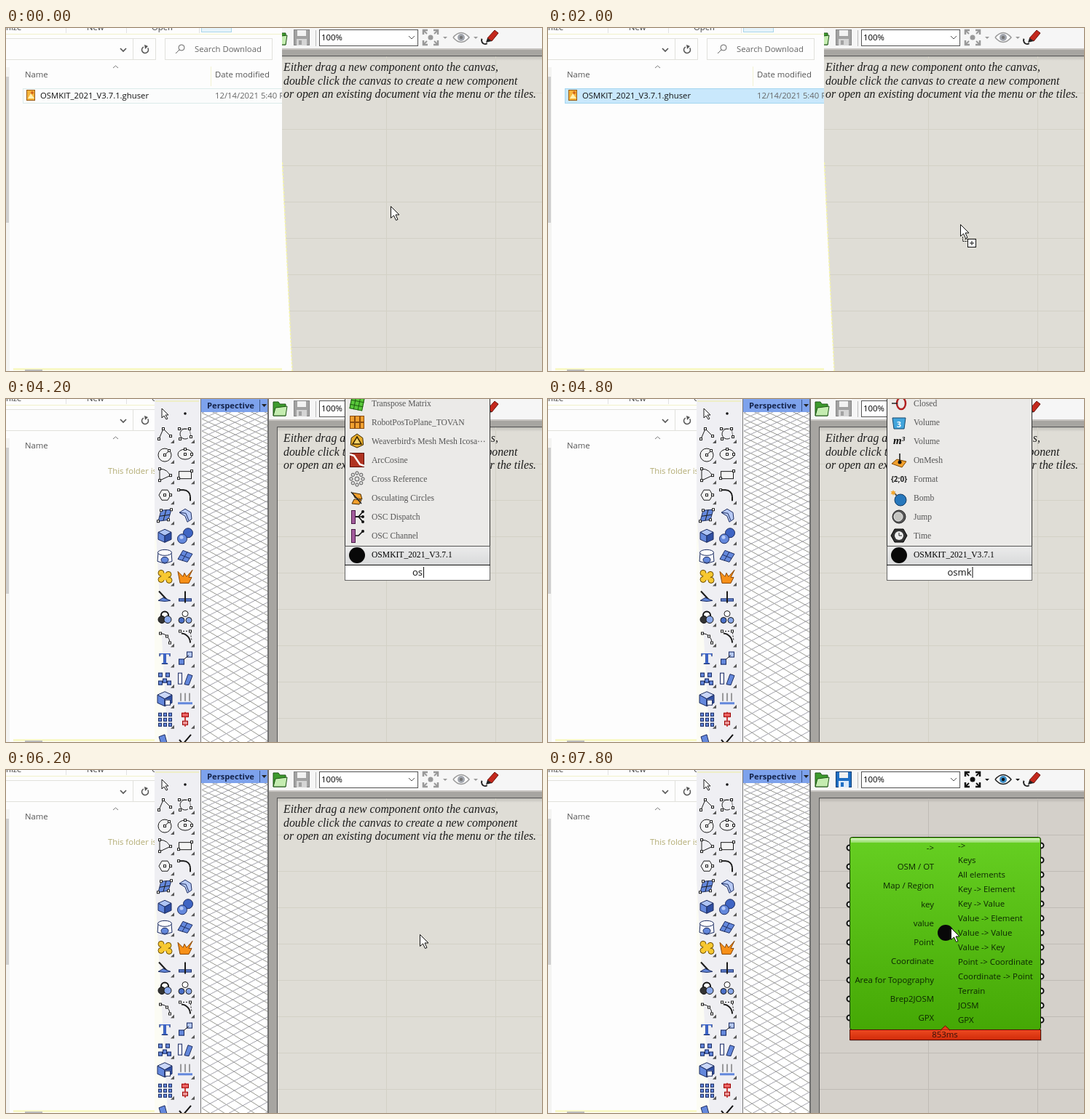
An HTML page with a canvas that plays this animation: 736 by 472 pixels, repeating every 8 s.

```html
<!DOCTYPE html>
<html lang="en">
<head>
<meta charset="utf-8">
<title>Component search</title>
<style>
html, body { margin: 0; width: 100%; height: 100%; overflow: hidden; background: #fff; }
canvas { display: block; }
</style>
</head>
<body>
<canvas id="stage" width="736" height="472"></canvas>
<script>
const g = document.getElementById('stage').getContext('2d');
const LOOP = 8000, STEP = 200, TAU = Math.PI * 2;
const SANS = '"Open Sans", "Noto Sans", sans-serif';
const SERIF = '"Liberation Serif", "Noto Serif", serif';
const BLUE = '#6488dc', NAVY = '#1c2c60', INK = '#1a1a1a';

// When things happen, in ms
const HOVER = 800, SELECT = 1000, DRAG = 1400, DROP = 2200, SWITCH = 2600,
  POPUP = 3000, TIP = 5400, CLOSE = 5800, PLACE = 6400;
const KEYS = [3800, 4000, 4600, 4800];

// ---- drawing helpers ----
function box(x, y, w, h, fill, edge) {
  if (fill) { g.fillStyle = fill; g.fillRect(x, y, w, h); }
  if (edge) { g.strokeStyle = edge; g.lineWidth = 1; g.strokeRect(x + .5, y + .5, w - 1, h - 1); }
}
function finish(fill, edge, w = 1) {
  if (fill) { g.fillStyle = fill; g.fill(); }
  if (edge) { g.strokeStyle = edge; g.lineWidth = w; g.stroke(); }
}
function trace(p) {
  g.beginPath();
  for (let i = 0; i < p.length; i += 2) g.lineTo(p[i], p[i + 1]);
}
function poly(p, fill, edge, w) { trace(p); g.closePath(); finish(fill, edge, w); }
function line(p, edge = INK, w = 1) { trace(p); finish(null, edge, w); }
function disc(x, y, r, fill, edge, w, ry = r) {
  g.beginPath(); g.ellipse(x, y, r, ry, 0, 0, TAU); finish(fill, edge, w);
}
function arc(x, y, r, a, b, edge = INK, w = 1) {
  g.beginPath(); g.arc(x, y, r, a, b); finish(null, edge, w);
}
function text(s, x, y, font, color = '#000', align = 'left') {
  g.font = font; g.fillStyle = color; g.textAlign = align; g.fillText(s, x, y);
}
function at(x, y, draw) { g.save(); g.translate(x, y); draw(); g.restore(); }
function clip(x, y, w, h, draw) {
  g.save(); g.beginPath(); g.rect(x, y, w, h); g.clip(); draw(); g.restore();
}
function fade(y0, y1, a, b) {
  const f = g.createLinearGradient(0, y0, 0, y1);
  f.addColorStop(0, a); f.addColorStop(1, b);
  return f;
}
function nodes(p) {
  for (let i = 0; i < p.length; i += 2) box(p[i] - 2, p[i + 1] - 2, 4, 4, '#fff', INK);
}
function star(n, r, inner, fill, edge) {
  const p = [];
  for (let i = 0; i < n * 2; i++) {
    const a = i * Math.PI / n, d = i % 2 ? inner : r;
    p.push(Math.sin(a) * d, -Math.cos(a) * d);
  }
  poly(p, fill, edge);
}
function cube(r, top, left, right) {
  const h = r * .55;
  poly([0, -r, r, -h, 0, 0, -r, -h], top, NAVY);
  poly([-r, -h, 0, 0, 0, r, -r, h], left, NAVY);
  poly([r, -h, 0, 0, 0, r, r, h], right, NAVY);
}
const logo = (x, y, r) => disc(x, y, r, '#080808');

// ---- modelling toolbar ----
const tools = [
  () => poly([-4, -7, -4, 6, -1, 3, 2, 8, 4, 7, 1, 2, 5, 2], '#fff', INK),
  () => disc(0, 0, 1.8, '#111'),
  () => { line([-8, 7, -2, -7, 8, 3]); nodes([-8, 7, -2, -7, 8, 3]); },
  () => { line([-8, -7, 6, -7, 8, 4], '#777'); arc(0, 0, 7, 1, 5); nodes([-8, -7, 6, -7, 8, 4, -7, 7]); },
  () => { disc(0, 1, 9, '#f4f4f4', INK); line([0, 1, 6, -5]); nodes([0, 1, 6, -5]); },
  () => { disc(0, 0, 10, '#f4f4f4', INK, 1, 7); nodes([0, 0, 0, -7, 9, 0]); },
  () => { line([-7, 8, -7, -8]); arc(-7, 8, 16, -1.5, -.4); line([-7, 8, 8, 1]); nodes([-7, 8, -7, -8, 8, 1]); },
  () => { box(-9, -5, 18, 11, '#f4f4f4', INK); nodes([-9, 5, 9, -5]); },
  () => { poly([-8, 0, -4, -7, 4, -7, 8, 0, 4, 7, -4, 7], '#f4f4f4', INK); nodes([0, 0, 8, 0]); },
  () => { line([-9, -7, -2, -7], INK, 2); arc(-2, 2, 9, -1.57, 0, INK, 2); line([7, 2, 7, 8], INK, 2); nodes([-9, -7]); },
  () => { poly([-5, -7, 9, -8, 5, 6, -9, 8], BLUE, NAVY); line([2, -8, -2, 7]); line([-7, 1, 7, -1]); nodes([-5, -7, 9, -8, 5, 6, -9, 8]); },
  () => { poly([-8, -4, 0, -9, 8, -4, 9, 5, 3, 9, 0, 1], '#b9cbf6', NAVY); line([-8, -4, 1, -3, 5, 7], NAVY); },
  () => cube(9, '#aec4f4', BLUE, '#2f4fa4'),
  () => { disc(4, -4, 6.5, '#3f65c4', NAVY); disc(-4, 4, 6.5, BLUE, NAVY); disc(-5, 2, 2.5, '#b6caf8'); },
  () => { poly([-9, -5, -10, 7, 0, 10, 10, 7, 9, -5], '#f4f6ff', NAVY); disc(0, 5, 5, BLUE, NAVY, 1, 4); disc(0, -5, 9.5, '#fff', NAVY, 1, 4); },
  () => { poly([-10, 4, -3, -8, 10, -3, 3, 8], BLUE, NAVY); line([-6, -2, 6, 3], NAVY); line([3, -6, -4, 6], NAVY); },
  () => { for (const [x, y] of [[-5, -5], [0, 0], [6, 5], [-5, 4], [5, -3]]) { disc(x, y, 4, '#f8c830', '#6c4c00'); } disc(0, 0, 5, '#f8c830'); },
  () => poly([-10, -7, -3, 0, -1, -5, 2, 0, 10, -9, 5, 1, 9, 1, 5, 9, -7, 9], '#f79018', '#8a4400'),
  () => { line([-8, -8, 4, 5], INK, 2); poly([-9, 5, -2, 1, 8, 5, 0, 6], BLUE, NAVY); },
  () => { box(-9, 2, 18, 4, BLUE, NAVY); line([0, -8, 0, 8], INK, 2); },
  () => { disc(0, -3, 5, '#fff', '#111', 2); disc(-4, 3, 5, '#333', '#111'); disc(4, 3, 5, '#89a8ea', '#111'); },
  () => { disc(0, -5, 4, '#fff', INK); disc(-5, 4, 4, '#4a6fc8', INK); disc(5, 4, 4, '#89a8ea', INK); },
  () => { arc(-6, 7, 13, -1.5, 0); nodes([-6, -6, 3, -2, 7, 7]); },
  () => { arc(-6, 7, 13, -1.5, 0, INK, 2); g.setLineDash([2, 2]); line([-7, -9, 7, -9, 9, 4]); g.setLineDash([]); nodes([-7, -9, 7, -9]); },
  () => { text('T', 0, 8, 'bold 24px ' + SERIF, NAVY, 'center'); text('T', 0, 7, 'bold 22px ' + SERIF, '#3c66cc', 'center'); },
  () => { box(-9, 1, 8, 8, BLUE, NAVY); box(2, -9, 8, 8, '#b6c9f4', NAVY); line([-2, 2, 5, -4]); },
  () => { for (const [x, y] of [[-9, -8], [1, -8], [-3, 0], [-9, 3], [3, 3]]) box(x, y, 6, 6, BLUE, NAVY); },
  () => { box(-10, -8, 6, 16, '#eef', NAVY); poly([-1, 8, 4, -6, 10, -4, 5, 9], BLUE, NAVY); },
  () => { cube(10, '#cbd8f8', BLUE, '#2f4fa4'); box(0, 1, 8, 8, '#fff', NAVY); },
  () => { line([-10, 6, 10, 6], BLUE, 3); for (let x = -6; x < 8; x += 6) line([x, -8, x, 3], '#444'); },
  () => { for (let i = 0; i < 9; i++) box(-9 + i % 3 * 7, -9 + (i / 3 | 0) * 7, 5, 5, BLUE, NAVY); },
  () => { line([0, -10, 0, 10], '#c00', 1.5); box(-5, -9, 10, 6, '#e66', '#900'); box(-4, 2, 8, 6, '#e99', '#900'); },
  () => poly([-8, -4, 0, -7, 4, 8, -4, 9], BLUE, NAVY),
  () => line([-8, 0, -3, 6, 8, -7], '#111', 2)
];

function modeller() {
  box(204, 0, 64, 472, '#efeff3');
  poly([204, 150, 222, 472, 204, 472], '#fcfcf4');
  box(205, 2, 60, 2, '#eeeec8');
  tools.forEach((draw, i) => {
    const x = i % 2 ? 246 : 218, y = 20 + (i >> 1) * 28.05;
    at(x, y, draw);
    if (i > 1) poly([x + 13, y + 8, x + 13, y + 13, x + 8, y + 13], '#555');
  });
  box(267, 0, 94, 472, '#fff');
  clip(269, 18, 90, 454, () => {
    for (let y = -45; y < 560; y += 8 + Math.max(0, y) * .012) {
      line([269, y, 360, y + 42 + y * .04], '#989991');
      line([269, y, 360, y - 40 - y * .02], '#a2a2ac');
    }
  });
  box(268, 0, 92, 18, '#7da2ec');
  text('Perspective', 276, 13, 'bold 11.2px ' + SANS, '#14234a');
  line([348.5, 1, 348.5, 17], '#3d5788');
  poly([351, 7, 358, 7, 354.5, 11], '#222');
  box(267, 0, 1, 472, '#777');
  box(359, 0, 2, 472, '#707070');
}

// ---- file browser ----
function browser(t, wide) {
  const w = wide ? 379 : 204, f = '11.3px ' + SANS;
  if (wide) {
    poly([379, 0, 379, 185, 393, 472, 0, 472, 0, 0], '#fdfdfd');
    g.setLineDash([3, 2]);
    line([379.5, 185, 393, 472], '#f6f6a8', 1.5);
    g.setLineDash([]);
  }
  clip(0, 0, w, 472, () => {
    box(0, 0, w, 472, '#fdfdfd');
    text('nize', 0, 3, f, '#444');
    text('New', 111, 3, f, '#444');
    text('Open', 200, 3, f, '#444');
    for (const x of [82, 165, 265]) box(x, 0, 1, 7, '#e2e2e2');
    box(268, -2, 42, 8, '#e6f4fb', '#a9d5e8');
    box(0, 8, w, 1, '#f2f2ca');
    box(-2, 14, 177, 30, '#fdfdfd', '#e1e1dc');
    box(174, 14, 32, 30, '#fdfdfd', '#e1e1dc');
    line([157, 28, 161, 32, 165, 28], '#555', 1.6);
    arc(191, 30, 4.5, -.6, 4.2, '#555', 1.5);
    poly([190, 23, 195, 25, 191, 29], '#555');
    box(218, 14, 148, 30, '#fdfdfd', '#e1e1dc');
    disc(241, 27, 4, null, '#666');
    line([238, 30, 233, 35], '#666');
    text('Search Download', 259, 33, f, '#666');
    line([147, 55, 150.5, 52, 154, 55], '#777');
    text('Name', 26, 68, f, '#555');
    text('Date modified', 287, 68, f, '#555');
    box(281, 53, 1, 27, '#f1f1d2');
    box(0, 54, 5, 418, '#f4f4f2');
    box(0, 67, 4, 201, '#cfcfcf');
    box(10, 468, w, 3, '#f8f8c6');
    box(26, 470, 24, 2, '#bbb');
    if (t >= DROP) text('This folder is empty.', 140, 103, f, '#b2ab72');
    else {
      const fill = t >= SELECT ? '#c9e8fc' : t >= HOVER ? '#e5f3fd' : '#fbfcfc';
      box(23, 83, 370, 21, fill, t >= HOVER ? '#a5d6f0' : '#dcebea');
      box(28, 85, 12, 15, '#f6b43a', '#9a5a12');
      poly([30, 97, 34, 90, 39, 97], '#fff0b0');
      disc(36, 89, 2, '#d4691e');
      text('OSMKIT_2021_V3.7.1.ghuser', 47, 97, f, '#111');
      text('12/14/2021 5:40 PM', 287, 97, f, '#666');
    }
  });
}

// ---- node editor ----
function editor(live) {
  box(361, 0, 375, 28, '#f6f6f6');
  poly([367, 4, 374, 4, 376, 7, 384, 7, 384, 23, 367, 23], '#3e9b2e', '#1c5514');
  poly([370, 12, 386, 10, 384, 23, 367, 23], '#c4ecb0', '#1c5514');
  const save = live ? '#1f6fc4' : '#a2a2a2';
  box(395, 2, 22, 22, save, live ? '#0d3c74' : '#858585');
  box(400, 3, 12, 8, '#f2f2f2');
  box(399, 15, 14, 9, live ? '#dceafa' : '#d5d5d5');
  box(402, 17, 4, 6, save);
  box(425, 3, 1, 22, '#bbb');
  box(430, 2, 136, 23, '#fff', '#555');
  text('100%', 433, 17, '11.4px ' + SANS);
  line([553, 11, 557, 15, 561, 11], '#555');

  const ink = live ? '#111' : '#999';
  at(583, 13, () => {
    disc(0, 0, 3.5, ink);
    for (let i = 0; i < 4; i++) {
      line([-10, -4, -10, -10, -4, -10], ink, 2.5);
      line([-9, -9, -5, -5], ink, 2);
      g.rotate(Math.PI / 2);
    }
  });
  for (const x of [603, 645]) poly([x - 3, 12, x + 3, 12, x, 15], ink);
  at(625, 13, () => {
    g.beginPath(); g.moveTo(-11, 0); g.quadraticCurveTo(0, -13, 11, 0);
    g.quadraticCurveTo(0, 13, -11, 0); finish('#fff', live ? '#222' : '#999', 1.5);
    disc(0, 0, 5, live ? '#3b8cc4' : '#a2a6ae');
    disc(0, 0, 2.2, live ? '#111' : '#777');
  });
  poly([661, 14, 671, 3, 676, 7, 667, 18], '#c4281c', '#6b140c');
  poly([661, 14, 667, 18, 659, 20], '#222');
  arc(658, 17, 5, 1, 3.6, '#222', 2);

  box(361, 28, 375, 444, '#a7a5a1');
  box(361, 28, 375, 2, '#c6c4c0');
  box(372, 38, 370, 440, live ? '#d4d0ca' : '#dfddd6', '#555');
  box(373, 39, 363, 6, fade(39, 45, 'rgba(0,0,0,.14)', 'rgba(0,0,0,0)'));
  const rule = live ? '#bfbbb5' : '#d3d1c6';
  for (let y = 89; y < 472; y += 50) box(373, y, 363, 1, rule);
  for (const x of [522, 672]) box(x, 39, 1, 433, rule);
  if (!live) [
    'Either drag a new component onto the canvas,',
    'double click the canvas to create a new component',
    'or open an existing document via the menu or the tiles.'
  ].forEach((s, i) => text(s, 381, 59 + i * 18.6, 'italic 15.8px ' + SERIF, '#1c1c1c'));
}

// ---- search results ----
const plug = dots => {
  box(-8, -9, 6, 19, '#a35b9c', '#4a1d47');
  for (const y of dots) { line([-2, 0, 2, 0, 8, y], '#111', 1.5); disc(8, y, 2, '#111'); }
};
const m3 = s => () => text(s, 0, 4, 'italic bold 15px ' + SERIF, '#111', 'center');
const broad = [
  ['Transpose Matrix', () => { g.rotate(.2); box(-9, -9, 18, 18, '#58c83a', '#1e5c12'); for (const p of [-3, 3]) { line([p, -9, p, 9], '#1e5c12'); line([-9, p, 9, p], '#1e5c12'); } }],
  ['RobotPosToPlane_TOVAN', () => { box(-10, -9, 20, 18, '#f0a030', '#8a4c10'); line([-3, -9, -3, 9], '#8a4c10', 2); line([4, -9, 4, 9], '#8a4c10', 2); line([-10, 0, 10, 0], '#8a4c10', 2); }],
  ["Weaverbird's Mesh Mesh Icosa\u22ef", () => { star(3, 10, 9, '#e8ae2c', '#3a2600'); poly([0, -6, 6, 4, -6, 4], '#f6d46a', '#3a2600', 1.5); }],
  ['ArcCosine', () => { box(-10, -10, 20, 20, '#b03422', '#5c1008'); line([-10, -8, -4, -6, 4, 6, 10, 8], '#fff', 2.5); }],
  ['Cross Reference', () => { for (let i = 0; i < 8; i++) disc(Math.cos(i * TAU / 8) * 8, Math.sin(i * TAU / 8) * 8, 2.2, '#ddd', '#555'); disc(0, 0, 3, '#ddd', '#555'); }],
  ['Osculating Circles', () => { poly([-6, -7, 5, -5, 7, 2, -3, 0], '#f2a02c', '#4a2c00'); poly([-4, 2, 6, 3, 3, 9, -7, 8], '#f2a02c', '#4a2c00'); line([-8, -8, 6, 8], '#222', 1.5); }],
  ['OSC Dispatch', () => plug([-7, 0, 7])],
  ['OSC Channel', () => plug([-6])]
];
const narrow = [
  ['Closed', () => { disc(3, 0, 6, null, '#b02020', 2.5, 8); line([-10, 0, -2, 0], '#222', 1.5); }],
  ['Volume', () => { poly([-9, -6, 9, -6, 7, 9, -7, 9], '#42a5dc', '#14486e'); text('3', 0, 7, 'bold 11px ' + SANS, '#fff', 'center'); }],
  ['Volume', m3('m\u00b3')],
  ['OnMesh', () => { poly([-10, 5, -3, -1, 10, 2, 4, 10], '#f2a02c', '#7c4600'); line([1, -9, 1, 3], '#111', 1.5); disc(1, 3, 2.5, '#111'); }],
  ['Format', () => text('{2;0}', 0, 4, 'bold 10px ' + SANS, '#222', 'center')],
  ['Bomb', () => { disc(2, 3, 8, '#2878bc', '#123c66'); line([-3, -3, -7, -7], '#555', 2); at(-8, -7, () => star(6, 4, 2, '#f6a82c')); }],
  ['Jump', () => { disc(0, 0, 9, '#555', '#222'); disc(-1, 0, 6, '#c4c4c0', '#eee'); }],
  ['Time', () => { poly([-11, 0, -6, -9, 6, -9, 11, 0, 6, 9, -6, 9], '#333', '#000'); disc(0, 0, 6, '#eee'); line([0, -4, 0, 0, 4, 0], '#222'); }]
];

function search(t) {
  const f = '11.6px ' + SERIF;
  const typed = 'osmk'.slice(0, KEYS.filter(k => t >= k).length);
  if (!typed) {
    box(465, 190, 200, 39, '#f0f2f1', '#111');
    text('Enter a search keyword\u22ef', 566, 213, 'italic ' + f, '#111', 'center');
  } else {
    box(465, -2, 200, 231, '#ebeae8', '#333');
    (typed.length < 3 ? broad : narrow).forEach(([name, icon], i) => {
      at(482, 6 + i * 26, icon);
      text(name, 502, 10 + i * 26, f, '#555');
    });
    box(465, 202, 200, 27, fade(202, 229, '#ececec', '#d8d9da'), '#555');
    logo(482, 215, 11);
    text('OSMKIT_2021_V3.7.1', 502, 218, f);
  }
  box(465, 228, 200, 22, '#fff', '#666');
  box(465, 228, 200, 1, '#111');
  text(typed, 565, 243, '13px ' + SANS, '#111', 'center');
  if (typed && t < 5000) box(566 + g.measureText(typed).width / 2, 231, 1, 15, '#111');
  if (t >= TIP) {
    box(608, 253, 140, 55, '#fdf9c8', '#222');
    box(609, 254, 138, 33, fade(254, 287, '#fdd468', '#f8bd4c'));
    logo(625, 270, 11);
    text('OSMKIT_2021_V3.7.1', 650, 275, 'italic 15px ' + SANS, '#222');
    text('OSMKIT_2021_V3.7.1', 615, 301, '10.2px ' + SERIF);
  }
}

// ---- placed component ----
const inputs = ['->', 'OSM / OT', 'Map / Region', 'key', 'value', 'Point', 'Coordinate',
  'Area for Topography', 'Brep2JOSM', 'GPX'];
const outputs = ['->', 'Keys', 'All elements', 'Key -> Element', 'Key -> Value', 'Value -> Element',
  'Value -> Value', 'Value -> Key', 'Point -> Coordinate', 'Coordinate -> Point', 'Terrain', 'JOSM', 'GPX'];

function component(x, y) {
  at(x, y, () => {
    const f = '11.4px ' + SANS, ink = '#0c2603';
    box(1, 265, 263, 16, 'rgba(0,0,0,.15)');
    inputs.forEach((s, i) => disc(0, 15 + i * 26, 3.5, '#fff', '#111', 2));
    outputs.forEach((s, i) => disc(263, 12 + i * 20, 3.5, '#fff', '#111', 2));
    g.beginPath(); g.roundRect(.5, .5, 262, 265, 3);
    finish(fade(0, 265, '#66cf22', '#45a805'), '#152c08');
    box(2, 2, 259, 6, fade(2, 8, '#d6f2c4', '#94dc66'));
    box(0, 265, 263, 15, fade(265, 280, '#ee4a22', '#d02a08'), '#5c1004');
    poly([125, 266, 131.5, 260, 138, 266], '#e63c14', '#5c1004');
    box(126, 266, 11, 2, '#ee4a22');
    text('853ms', 131, 276, f, '#30100a', 'center');
    logo(132, 132, 11);
    inputs.forEach((s, i) => text(s, 116, 19 + i * 26, f, ink, 'right'));
    outputs.forEach((s, i) => text(s, 149, 16 + i * 20, f, ink));
  });
}

// ---- motion: [time, x, y] stops ----
const hand = [
  [0, 528, 245], [800, 150, 92], [1400, 150, 92], [2000, 566, 270], [2200, 566, 270],
  [2600, 566, 239], [5000, 566, 239], [5400, 578, 222], [5800, 578, 222],
  [6400, 564, 228], [6800, 564, 228], [7200, 604, 308], [7600, 496, 214], [7800, 553, 217]
];
const node = [[6800, 434, 107], [7200, 474, 187], [7600, 364, 89], [7800, 414, 92]];

function along(path, t) {
  let i = 0;
  while (i < path.length - 2 && t >= path[i + 1][0]) i++;
  const [a, x0, y0] = path[i], [b, x1, y1] = path[i + 1];
  const u = Math.min(1, Math.max(0, (t - a) / (b - a))), k = u * u * (3 - 2 * u);
  return [Math.round(x0 + (x1 - x0) * k), Math.round(y0 + (y1 - y0) * k)];
}

function pointer(t) {
  const [x, y] = along(hand, t);
  if (t >= KEYS[0] && t <= 5000) return;
  at(x + .5, y + .5, () => {
    if (t >= POPUP && t < KEYS[0]) {
      line([-3, -8, 0, -7, 3, -8], '#111');
      line([0, -7, 0, 8], '#111', 1.5);
      line([-3, 9, 0, 8, 3, 9], '#111');
      return;
    }
    poly([0, 0, 0, 16, 4, 12.5, 7, 19, 9.5, 18, 6.5, 11.5, 11.5, 11.5], '#fff', '#111');
    if (t >= DRAG && t < DROP && x > 380) {
      g.setLineDash([2, 1]);
      line([3, 17, 3, 23, 12, 23], '#111');
      line([6, 20, 14, 20], '#111');
      g.setLineDash([]);
      box(9.5, 19.5, 12, 12, '#fff', '#111');
      line([12.5, 25.5, 18.5, 25.5], '#111');
      line([15.5, 22.5, 15.5, 28.5], '#111');
    }
  });
}

function draw(t) {
  const wide = t < SWITCH, live = t >= PLACE;
  box(0, 0, 736, 472, '#fdfdfd');
  if (!wide) modeller();
  editor(live);
  browser(t, wide);
  if (t >= POPUP && t < CLOSE) search(t);
  if (live) clip(361, 28, 375, 444, () => component(...along(node, t)));
  pointer(t);
}

const start = performance.now();
function tick() {
  const t = (performance.now() - start) % LOOP;
  draw(Math.floor(t / STEP) * STEP);
  requestAnimationFrame(tick);
}
tick();
</script>
</body>
</html>
```
